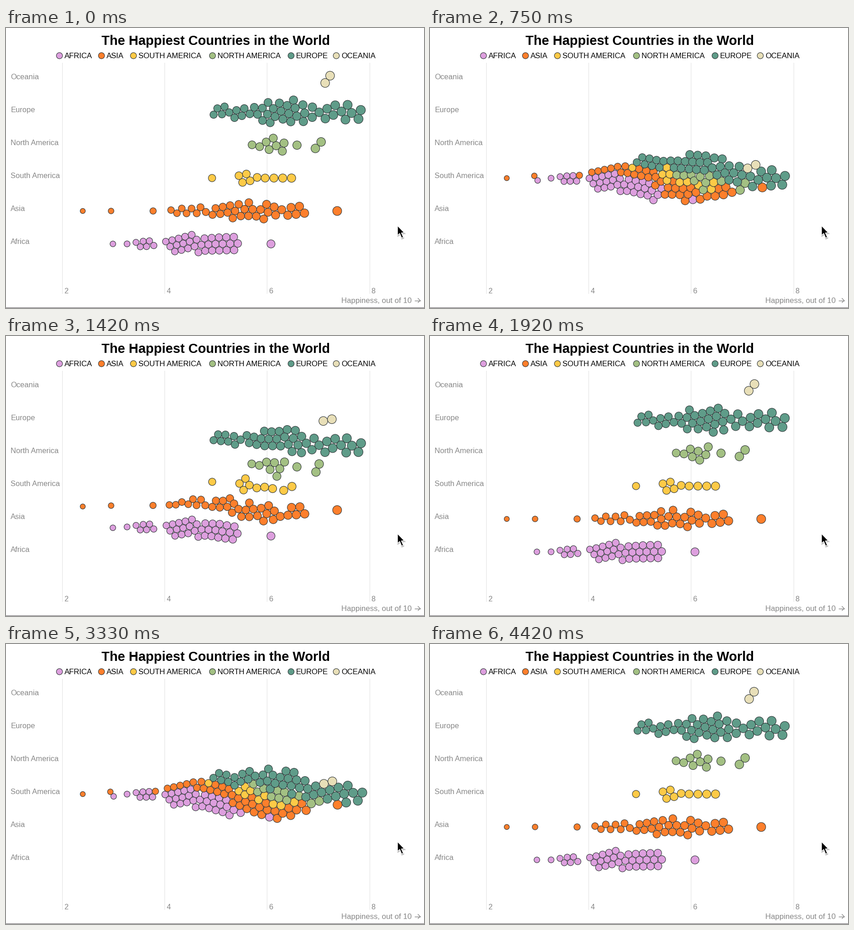
A matplotlib script that plays this animation: 915 by 612 pixels, repeating every 4.46 s.

```python
import numpy as np
import matplotlib.pyplot as plt
from matplotlib.animation import FuncAnimation
from matplotlib.collections import EllipseCollection
from matplotlib.patches import Polygon

WIDTH, HEIGHT, DPI = 915, 612, 64
LOOP_MS, STEP_MS = 4460, 20
SHOT_MS = LOOP_MS / 107            # pictures are held at about 24 per second
TICK_MS = 1000 / 60                # physics rate
STARTS = (110, 1310, 2513, 3690)   # merge, split, merge, split
MERGED_Y = 328
GREY, INK = "#888888", "#2e3436"

# Name, colour, legend x, and the spread of scores as {rank: x};
# countries ranked in between are evenly spaced.
GROUPS = [
    ("Africa", "#dd9fde", 117,
     {0: 234, 1: 265, 2: 286, 7: 322, 8: 357, 23: 425, 24: 439, 38: 499, 39: 580}),
    ("Asia", "#fd7f2c", 209,
     {0: 168, 1: 230, 2: 322, 3: 363, 13: 471, 22: 528, 32: 598, 33: 620,
      37: 648, 38: 725}),
    ("South America", "#fdca47", 279, {0: 451, 1: 514, 4: 531, 5: 548, 9: 625}),
    ("North America", "#a3c083", 452,
     {0: 540, 2: 571, 7: 607, 8: 637, 9: 680, 10: 687}),
    ("Europe", "#5f9c89", 624,
     {0: 456, 8: 522, 11: 557, 29: 647, 33: 687, 43: 776}),
    ("Oceania", "#e8dfb8", 723, {0: 701, 1: 707}),
]


def row_y(k):
    return 472 - 72 * k


def spread(keys):
    return np.interp(range(max(keys) + 1), list(keys), list(keys.values()))


columns = [spread(g[3]) for g in GROUPS]
counts = [len(c) for c in columns]
xs = np.concatenate(columns)
rows = np.column_stack([xs, np.repeat([row_y(k) for k in range(6)], counts)])
middle = np.column_stack([xs, np.full(len(xs), MERGED_Y)])
colors = np.repeat([g[1] for g in GROUPS], counts)
radius = 3.62 * np.sqrt(2 + (xs - 123) / 112.2)


def collide(pos, vel, r):
    """Push overlapping dots apart, smaller ones further."""
    for i in range(len(pos) - 1):
        delta = pos[i] + vel[i] - pos[i + 1:] - vel[i + 1:]
        dist = np.hypot(delta[:, 0], delta[:, 1])
        reach = r[i] + r[i + 1:]
        hit = np.flatnonzero(dist < reach)
        if not hit.size:
            continue
        d = np.maximum(dist[hit], 1e-6)
        push = delta[hit] * ((reach[hit] - d) / d)[:, None]
        j = hit + i + 1
        share = (r[j] ** 2 / (r[i] ** 2 + r[j] ** 2))[:, None]
        vel[i] += (push * share).sum(axis=0)
        vel[j] -= push * (1 - share)


def run(pos, goal, ticks=75):
    """Pull dots towards their goals with fading force; return every tick."""
    pos, vel, alpha = pos.copy(), np.zeros_like(pos), 1
    track = [pos.copy()]
    for _ in range(ticks):
        vel += (goal - pos) * (0.25, 0.11) * alpha
        for _ in range(2):
            collide(pos, vel, radius * 0.99)
        vel *= 0.6
        pos += vel
        alpha *= 0.9772
        track.append(pos.copy())
    return track


jitter = np.random.default_rng(4).normal(0, 3, len(xs))
state = run(rows + np.column_stack([0 * xs, jitter]), rows)[-1]
runs = []
for goal in (middle, rows, middle, rows):
    runs.append(run(state, goal))
    state = runs[-1][-1]


def places(t):
    if t < STARTS[0]:
        t += LOOP_MS
    phase = sum(t >= s for s in STARTS) - 1
    track = runs[phase]
    age = min((t - STARTS[phase]) / TICK_MS, len(track) - 1.001)
    k = int(age)
    return track[k] + (track[k + 1] - track[k]) * (age - k)


fig = plt.figure(figsize=(WIDTH / DPI, HEIGHT / DPI), dpi=DPI, facecolor="white")
ax = fig.add_axes([0, 0, 1, 1])
ax.set_xlim(0, WIDTH)
ax.set_ylim(HEIGHT, 0)
ax.axis("off")


def pt(px):
    return px * 72 / DPI


def label(x, y, text, size, color=GREY, **kw):
    ax.text(x, y, text, fontsize=pt(size), color=color, va="baseline",
            family="Liberation Sans", **kw)


def line(x, y, color, width=1):
    ax.plot(x, y, color=color, lw=pt(width), zorder=1)


def circles(centers, radii, fills):
    size = 2 * np.asarray(radii)
    dots = EllipseCollection(
        size, size, np.zeros(len(size)), units="x", offsets=centers,
        offset_transform=ax.transData, facecolors=fills, edgecolors=INK,
        linewidths=pt(1.1), zorder=3)
    ax.add_collection(dots, autolim=False)
    return dots


# Title and legend
label(459.5, 37, "The Happiest Countries in the World", 29, "black",
      weight="bold", ha="center")
circles([(g[2], 60.5) for g in GROUPS], [6.7] * len(GROUPS),
        [g[1] for g in GROUPS])
for name, _, x, _ in GROUPS:
    label(x + 11, 66, name.upper(), 16.6, "black")

# Grid and axis labels
for k, value in enumerate((2, 4, 6, 8)):
    x = 123 + 224.2 * k
    line([x, x], [76, 580], "#e0e0e0")
    label(x + 4, 579.5, str(value), 16.4)
for k, group in enumerate(GROUPS):
    label(10.4, row_y(k), group[0], 16.5)
label(888.5, 601, "Happiness, out of 10", 16.7, ha="right")
line([894.5, 906.5], [595.5, 595.5], GREY, 1.4)
line([902, 906.5, 902], [591, 595.5, 600], GREY, 1.4)
line([0, WIDTH], [611, 611], "#777477", 1.4)

# Mouse pointer
pointer = np.array([(857, 432), (857, 453.5), (861.8, 449), (866, 459),
                    (869.8, 457.4), (865.6, 447.8), (872, 447.5)])
for shift, alpha in ((2.2, 0.10), (1.3, 0.14)):
    ax.add_patch(Polygon(pointer + (0.6, shift), fc="black", ec="black",
                         lw=pt(2.5), alpha=alpha, zorder=4))
ax.add_patch(Polygon(pointer, fc="black", ec="white", lw=pt(1.5), zorder=5))

swarm = circles(places(0), radius, colors)


def draw(frame):
    shot = int((frame * STEP_MS + STEP_MS / 2) / SHOT_MS)
    swarm.set_offsets(places(shot * SHOT_MS))
    return [swarm]


anim = FuncAnimation(fig, draw, frames=LOOP_MS // STEP_MS, interval=STEP_MS,
                     repeat=True, repeat_delay=0, blit=False)
plt.show()
```
